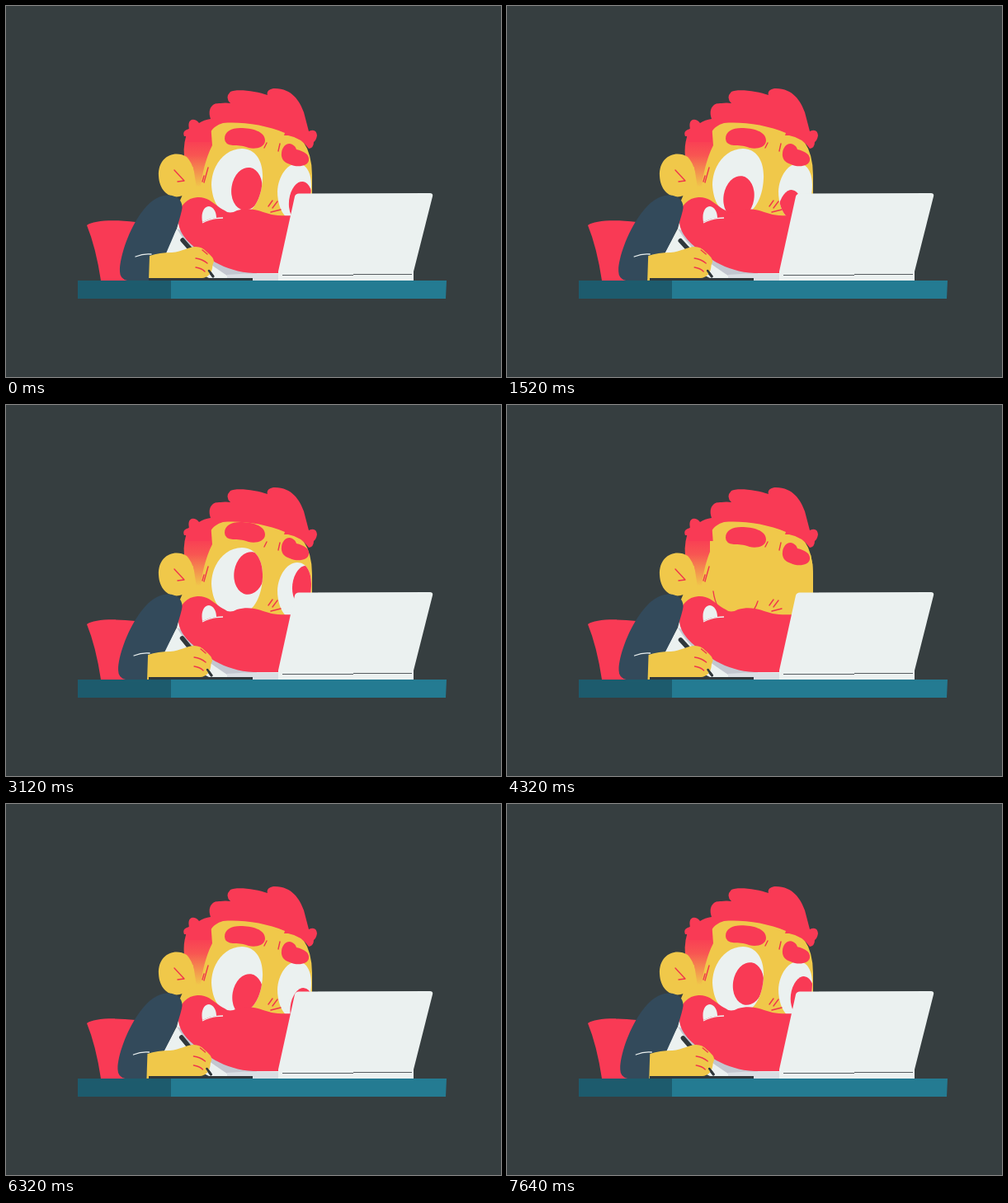
Animation of 600x450 px, one loop 7.68 s. Source, as an HTML page:

```html
<!DOCTYPE html>
<html lang="en">
<head>
<meta charset="utf-8">
<title>Working at the desk</title>
<style>
  html, body { margin: 0; width: 100%; height: 100%; overflow: hidden; background: #363e40; }
  svg { display: block; width: 100%; height: 100%; }
  .red { fill: #f93a55; }
  .skin { fill: #f0c84a; }
  .white { fill: #ebf1f0; }
  .line { fill: none; stroke: #f0364c; stroke-width: 1.4; stroke-linecap: round; stroke-linejoin: round; }
</style>
</head>
<body>
<svg viewBox="0 0 600 450">
  <defs>
    <linearGradient id="fade" gradientUnits="userSpaceOnUse" x1="0" y1="160" x2="0" y2="220">
      <stop offset="0" stop-color="#f93a55"/>
      <stop offset=".35" stop-color="#f85552"/>
      <stop offset="1" stop-color="#f0c84a"/>
    </linearGradient>
    <path id="face" d="M246 148L264 130L345 142L360 164Q371 180 371 205V240L345 275H232L205 250L216 224L230 180Z"/>
    <clipPath id="clipFace"><use href="#face"/></clipPath>
    <clipPath id="clipL"><path id="eyeL" d="M249 217C249 194 265 173 286 173C303 173 312 189 311 209C310 234 299 254 280 255C260 256 250 238 249 217Z"/></clipPath>
    <clipPath id="clipR"><path id="eyeR" d="M329 225C330 206 341 191 353 191C364 191 370 202 370 217C370 240 360 260 345 258C335 257 329 240 329 225Z"/></clipPath>
  </defs>

  <!-- chair -->
  <path class="red" d="M98 266C106 260 130 259 157 262L165 333H115Q109 293 98 266Z"/>

  <!-- head -->
  <use href="#face" class="skin"/>
  <path fill="url(#fade)" d="M222 148L248 142L250 169C242 185 238 203 236 219L228 218L227 196L216 183Q214 165 222 148Z"/>
  <path class="skin" d="M219 183C204 174 184 183 185 206C186 228 203 236 216 229L231 221L228 201Q225 189 219 183Z"/>

  <!-- eyes -->
  <use href="#eyeL" class="white"/>
  <use href="#eyeR" class="white"/>
  <g clip-path="url(#clipL)"><ellipse id="pupilL" class="red" rx="18.5" ry="26"/></g>
  <g clip-path="url(#clipR)"><ellipse id="pupilR" class="red" rx="14" ry="24"/></g>
  <g id="lids" clip-path="url(#clipFace)">
    <path id="lidL" class="skin"/>
    <path id="lidR" class="skin"/>
    <path id="crease" class="line"/>
  </g>

  <path class="line" d="M204 199L216 212L208 213M240 214L245 196M238 213L240 206"/>
  <path class="line" d="M318 243L323 236M323 245L329 237M321 250L333 247M316 166L313 172M332 167L330 176"/>
  <g id="brows" class="red">
    <path d="M265 161C265 152 273 148 284 148C298 148 314 152 314 163C314 172 302 174 294 172C286 169 281 169 275 169Q265 168 265 161Z"/>
    <path d="M334 178C335 170 341 165 347 168Q351 170 352 174C361 176 368 180 367 187C366 195 352 196 344 192C337 190 333 185 334 178Z"/>
  </g>

  <!-- hair -->
  <path class="red" d="M216 158Q213 151 222 149Q220 140 225 138Q230 137 234 142Q240 138 248 137C244 126 249 117 260 118Q266 117 272 118Q265 111 272 104C279 100 304 103 317 108Q315 102 324 100C346 99 356 115 361 129L367 152Q376 148 377 157Q376 163 373 165Q373 172 367 173Q358 160 342 157L337 157L338 154C315 144 284 140 263 142Q250 146 247 155L248 165H219L222 158Z"/>

  <!-- shirt and beard -->
  <path class="white" d="M213 246L207 270L190 302L250 332H330V324L270 306Z"/>
  <path fill="#c3c7d0" d="M207 270C224 298 244 311 268 327L304 328V310Z"/>
  <path class="red" d="M209 262C208 244 218 233 232 232C247 231 254 243 265 248Q271 253 280 248C298 243 310 250 322 253Q332 255 350 254L330 324H300C274 323 252 312 238 300C226 291 210 279 209 262Z"/>
  <path class="white" d="M238 262C236 251 240 243 246 243C252 244 255 250 255 257Q246 258 238 262Z"/>
  <path fill="none" stroke="#ebf1f0" stroke-width="1.3" d="M238 263Q249 257 263 257"/>

  <!-- arm -->
  <path id="sleeve" fill="#334a5b"/>
  <g id="hand">
    <g id="pen" stroke="#30383c" stroke-linecap="round">
      <path stroke-width="5.5" d="M214 284L241 315"/>
      <path stroke-width="3" d="M241 315L251 328"/>
    </g>
    <path class="skin" d="M173 333L174 303Q186 299 201 299C214 298 221 292 230 292Q238 292 243 298Q252 305 252 310Q250 314 250 318Q249 324 244 328Q239 331 232 330L206 331Z"/>
    <path class="line" d="M230 306Q238 307 244 312M230 317Q237 318 241 322M238 296L244 301"/>
    <path fill="none" stroke="#30383c" stroke-width="2.6" stroke-linecap="round" d="M246 321L251 328"/>
    <path fill="none" stroke="#ebf1f0" stroke-width="1.3" stroke-linecap="round" d="M157 304Q167 300 176 301"/>
  </g>

  <!-- desk and laptop -->
  <path fill="#d9dee3" d="M268 326Q300 323 334 325V334H268Z"/>
  <path fill="#30383c" d="M173 330H299V334H173Z"/>
  <path fill="#247b92" d="M87 333H534L533 355H87Z"/>
  <path fill="#1d5b6d" d="M87 333H200V355H87Z"/>
  <path class="white" d="M355 227.500L514 227Q518 227 517 231L494 322V333H330V322L350 231Q351 227.500 355 227.500Z"/>
  <path fill="none" stroke="#30383c" stroke-opacity=".8" d="M335 326.500H421M421 325.500H478M478 325.500H492"/>
</svg>
<script>
const $ = id => document.getElementById(id);
const PERIOD = 3840;

// Eased value between keys [time, value]
function track(keys, t) {
  let i = 1;
  while (i < keys.length - 1 && t > keys[i][0]) i++;
  const [t0, a] = keys[i - 1], [t1, b] = keys[i];
  const u = Math.min(1, Math.max(0, (t - t0) / (t1 - t0)));
  return a + (b - a) * u * u * (3 - 2 * u);
}

const lookX = [[-260, 4], [180, -1], [920, -1], [1400, -10], [1960, -10], [2400, 2], [2540, 2], [2860, 4], [3580, 4], [4020, -1]];
const lookY = [[-260, -18], [180, 10], [2540, 10], [2860, -18], [3580, -18], [4020, 10]];
const browY = [[2560, 0], [2860, -6], [3560, -6], [3870, 0]];
const blink = [[200, 0], [400, 1], [560, 1], [780, 0]];

// Lower edge of a lid, sagging as it closes
const lidEdge = (x0, x1, y, sag) =>
  `M${x0} ${y - 12}C${x0 + 6} ${y + sag} ${x1 - 10} ${y + sag} ${x1} ${y}`;

function drawLids(p) {
  $('lids').style.display = p > 0 ? '' : 'none';
  const yL = 176 + 62 * p, yR = 194 + 58 * p, sag = 32 * p;
  $('lidL').setAttribute('d', lidEdge(246, 314, yL + 6 * p, sag) + 'V165H246Z');
  $('lidR').setAttribute('d', lidEdge(326, 373, yR + 6 * p, sag) + 'V182H326Z');
  $('crease').setAttribute('d', lidEdge(250, 304, yL, sag));
}

function draw(now) {
  const t = Math.floor(now / 40) * 40 % PERIOD;
  const a = 2 * Math.PI * t / PERIOD;

  const dx = track(lookX, t), dy = track(lookY, t);
  $('pupilL').setAttribute('transform', `translate(${291 + dx} ${222 + dy}) rotate(9)`);
  $('pupilR').setAttribute('transform', `translate(${356 + 1.3 * dx} ${237 + dy}) rotate(7)`);
  $('brows').setAttribute('transform', `translate(0 ${track(browY, t)})`);
  drawLids(track(blink, t));

  // Slow drift of the arm plus quick pen strokes
  const h = -2.5 + 1.5 * Math.cos(a) + Math.cos(20 * a);
  $('hand').setAttribute('transform', `translate(${h} 0)`);
  $('pen').setAttribute('transform', `rotate(${-2 * Math.sin(a)} 250 328)`);
  $('sleeve').setAttribute('d',
    `M${138 + h} 322C${137 + h} 300 160 236 191 230C207 227 216 237 213 248` +
    `C208 270 ${200 + h / 2} 286 ${194 + h} 300L${175 + h} 304V333H${147 + h}Q${138 + h} 331 ${138 + h} 322Z`);
  requestAnimationFrame(() => draw(performance.now()));
}
draw(0);
</script>
</body>
</html>
```
